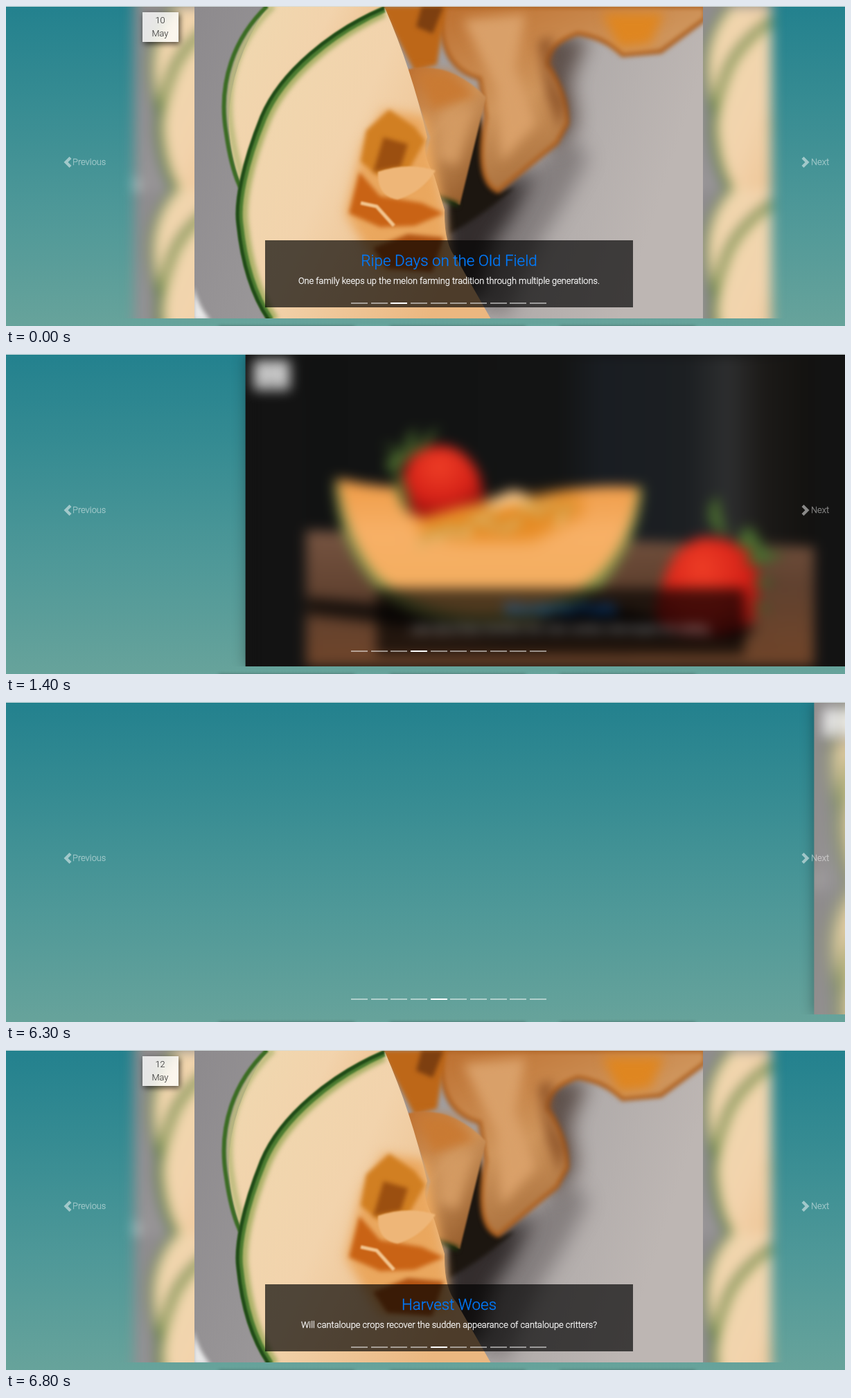
These frames come from a looping animation (1211x463 px, 8 s). An HTML page:

```html
<!DOCTYPE html>
<html lang="en">
<head>
<meta charset="utf-8">
<title>Melon carousel</title>
<style>
  html, body { margin: 0; width: 100%; height: 100%; overflow: hidden; }
  body { font: 300 12.8px/19.2px Roboto, sans-serif; }
  #stage { position: relative; width: 1211px; height: 463px; overflow: hidden;
    background: linear-gradient(#23818e, #358b92 28%, #4e9898 64%, #67a39b); }
  #stage::before { content: ""; position: absolute; z-index: 3; width: 100%; height: 1px; background: #d5dfe0; }
  .card { position: absolute; top: 464px; width: 196px; height: 20px; box-shadow: 0 0 5px #0007; }
  #carousel { position: absolute; top: 1px; width: 1211px; height: 451px; overflow: hidden; }
  .slide { position: absolute; left: 185px; width: 920px; height: 451px; }
  .slide svg { position: absolute; overflow: visible; }
  .moving { overflow: hidden; background: var(--base); box-shadow: 0 0 18px #0005; }
  .moving .content { position: absolute; inset: 0; filter: blur(9px); }
  .backdrop { filter: blur(9px); }
  .b1 { filter: blur(1px); }
  .b3 { filter: blur(3px); }
  .b8 { filter: blur(8px); }
  .b14 { filter: blur(14px); }
  .date { position: absolute; left: 11.5px; top: 8px; width: 52px; height: 41px; padding-top: 2px;
    text-align: center; color: #222; background: #ffffffc8; box-shadow: 2px 3px 8px #000a; }
  .caption { position: absolute; left: 189px; top: 338px; width: 531px; height: 81px; padding-top: 16px;
    text-align: center; color: #fff; background: #000000ab; }
  .caption, .control { -webkit-text-stroke: .3px currentColor; }
  h5 { margin: 0 0 6.4px; font: 300 22.4px/26.9px Roboto, sans-serif; color: #007bff; }
  p { margin: 0; }
  .control { position: absolute; top: 216px; left: 96px; color: #fff; opacity: .5; }
  .control svg { position: absolute; left: -15.5px; top: 2px; width: 16px; height: 16px; fill: #fff; }
  .next { left: 1162px; }
  .next svg { left: -16.5px; }
  .dot { position: absolute; top: 429px; width: 24px; height: 2.4px; background: #fff; }
</style>
</head>
<body>
<svg width="0" height="0" style="position:absolute">
  <defs>
    <linearGradient id="table" x2="1" y2=".2">
      <stop stop-color="#8d8a8d"/><stop offset=".5" stop-color="#a19e9f"/><stop offset="1" stop-color="#bdb6b3"/>
    </linearGradient>
    <linearGradient id="flesh" x2="1" y2=".6">
      <stop stop-color="#efd9b0"/><stop offset=".5" stop-color="#f2d3ac"/><stop offset="1" stop-color="#ebb780"/>
    </linearGradient>
    <linearGradient id="chunk" x2=".6" y2="1">
      <stop stop-color="#bd7030"/><stop offset=".5" stop-color="#cf955c"/><stop offset="1" stop-color="#9a6130"/>
    </linearGradient>
    <linearGradient id="dark">
      <stop stop-color="#111212"/><stop offset=".5" stop-color="#131414"/><stop offset=".58" stop-color="#191d22"/>
      <stop offset=".75" stop-color="#1c1f22"/><stop offset=".83" stop-color="#2d2e2f"/><stop offset=".9" stop-color="#1c1a18"/>
      <stop offset="1" stop-color="#12110f"/>
    </linearGradient>
    <linearGradient id="wood" x2=".1" y2="1">
      <stop stop-color="#765441"/><stop offset=".5" stop-color="#60412f"/><stop offset="1" stop-color="#70452a"/>
    </linearGradient>
    <linearGradient id="pulp" x2="0" y2="1">
      <stop stop-color="#ee9a45"/><stop offset=".4" stop-color="#f7b066"/><stop offset="1" stop-color="#f1ac5c"/>
    </linearGradient>
    <radialGradient id="berry" cx=".45" cy=".3" r=".75">
      <stop stop-color="#ee3a25"/><stop offset=".6" stop-color="#d41c15"/><stop offset="1" stop-color="#86100d"/>
    </radialGradient>
  </defs>

  <symbol id="slices" viewBox="272 1 734 451" preserveAspectRatio="none">
    <path fill="url(#table)" d="M272 0h734v453H272z"/>
    <path class="b14" fill="#5a5354" opacity=".5" d="M640 290L730 250 820 190 840 220Q800 300 770 340L720 453 640 400z"/>
    <path class="b14" fill="#332d2d" d="M630 285L710 262 760 240Q735 305 705 340L680 430 630 400z"/>
    <path class="b14" fill="#4b3c36" opacity=".8" d="M770 40L840 45 815 110 825 170 790 215 770 170z"/>
    <path class="b3" fill="#1c1610" d="M640 290L675 120 712 270 735 262Q700 295 640 330z"/>
    <path class="b3" fill="url(#chunk)" stroke="#ad5f1e" stroke-width="6" d="M628 0H1010V18L945 66 890 71Q865 46 825 40 780 55 782 85 810 130 810 170L795 198 710 268Q676 255 692 160L684 105Q622 90 628 0z"/>
    <path class="b8" fill="#d9a069" d="M660 20L750 12 735 90 765 170 715 225 708 120z"/>
    <path class="b8" fill="#7d431c" opacity=".7" d="M768 50L790 45 785 90 808 140 800 180 780 130z"/>
    <path class="b8" fill="#df8620" d="M860 10h90l-20 45-45 5z"/>
    <path class="b3" fill="#bd6718" d="M540 0H636L622 85 590 95z"/>
    <path class="b3" fill="#7d3f10" d="M592 30L616 40 632 0H600z"/>
    <path class="b1" fill="url(#chunk)" d="M578 92Q640 78 693 132L655 288 598 264 612 190z"/>
    <path class="b8" fill="#c97a33" d="M590 95L640 95 680 130 615 150z"/>
    <path class="b8" fill="#d39a62" d="M630 155L675 145 652 230 622 220z"/>
    <path class="b3" fill="none" stroke="#20330f" stroke-width="7" d="M593 265L653 288"/>
    <path fill="url(#flesh)" d="M378 0H545L340 262Q290 130 378 0z"/>
    <path class="b3" fill="none" stroke="#bcbb7c" stroke-width="9" d="M386 0C338 45 313 110 326 185 330 215 338 240 344 258"/>
    <path class="b1" fill="none" stroke="#3b6c24" stroke-width="6" d="M377 0C330 45 305 110 318 185 323 220 330 245 338 262"/>
    <path fill="url(#flesh)" d="M547 3Q585 90 608 190 598 210 618 245L633 295Q632 345 650 365L700 453H378C355 420 340 375 334 315 330 285 340 230 368 160 395 95 470 35 547 3z"/>
    <path class="b3" fill="none" stroke="#a9b066" stroke-width="12" d="M546 10C476 42 404 100 377 164 350 230 340 285 344 315 350 375 365 420 388 454"/>
    <path class="b1" fill="none" stroke="#4c7c31" stroke-width="9" d="M546 5C472 38 399 97 372 162 344 230 334 285 338 315 344 375 359 420 382 454"/>
    <path class="b1" fill="none" stroke="#1f4a17" stroke-width="5" d="M546 3C470 35 396 95 369 160 341 230 331 285 335 315 341 375 356 420 379 454"/>
    <path class="b8" fill="#eaa75e" d="M545 150L605 160 632 300 640 380 540 385 490 300 515 200z"/>
    <path class="b3" fill="#d17f22" d="M553 150L590 175 605 195 580 240 535 245 512 225 520 180z"/>
    <path class="b3" fill="#9b4f10" d="M545 190L580 200 570 232 530 240z"/>
    <path class="b3" fill="#c96315" d="M510 240L540 275 600 285 632 300 590 318 540 320 495 300z"/>
    <path class="b3" fill="#b05212" d="M530 350L580 330 632 335 615 385 550 380z"/>
    <path class="b1" fill="#eeb678" d="M537 240Q580 225 620 238 600 270 565 280 535 275 537 240z"/>
    <path class="b1" fill="none" stroke="#f2c58f" stroke-width="5" d="M512 285L535 290 560 318"/>
    <path class="b3" fill="#e8e8e8" d="M270 405Q278 435 295 455H270z"/>
  </symbol>

  <symbol id="strawberries" viewBox="272 1 734 451">
    <path fill="url(#dark)" d="M272 0h734v453H272z"/>
    <path fill="url(#wood)" d="M272 255L1006 279V453H272z"/>
    <g id="grain" stroke="#2c1a10" fill="none"></g>
    <path class="b3" fill="#17100c" d="M272 352L390 362 640 350 800 385 925 395 900 415 560 410 272 376z"/>
    <path fill="#7d9146" d="M313 178Q316 290 392 355 440 392 530 392 640 390 700 335 755 270 758 190L740 200 690 300 560 360 400 320z"/>
    <path class="b3" fill="#8b7c40" d="M400 355Q530 400 660 360L600 392Q490 402 400 355z"/>
    <path fill="url(#pulp)" d="M318 180Q370 192 402 192L432 235 530 215 578 198 600 208Q680 186 752 193 742 270 695 318 630 376 520 376 425 372 372 318 330 265 318 180z"/>
    <path class="b8" fill="#e68a22" d="M430 230L530 215 665 200 672 230 600 270 500 270 440 260z"/>
    <path class="b1" fill="#f2c184" d="M528 216L570 196 592 204 598 214 545 225z"/>
    <g id="pips" stroke="#a8691b" stroke-width="1"></g>
    <path fill="url(#berry)" d="M413 175Q420 140 455 133 492 128 514 160 530 185 528 213L440 237Q408 228 413 175z"/>
    <g fill="#4c6a2e" stroke="#2a421a">
      <path d="M388 158Q395 140 420 140L450 134 422 148 400 172 390 168z"/>
      <path d="M418 140Q410 120 433 106 424 125 428 142zM428 140Q440 120 464 106L458 118 436 142zM414 142L382 134Q400 128 414 142z"/>
      <path d="M402 165Q398 205 424 234 420 195 408 172z"/>
    </g>
    <path fill="url(#berry)" d="M788 330Q800 280 840 266 885 262 915 288 932 320 922 375 910 410 850 410 785 412 777 380 775 355 788 330z"/>
    <g fill="#4a6b30" stroke="#243a18">
      <path d="M868 205Q845 220 858 250L884 266Q870 240 868 205z"/>
      <path d="M895 280Q895 250 915 250L938 285 964 290 930 305 905 303 918 285z"/>
      <path d="M920 325L950 328 925 340zM915 358L944 368 925 372z"/>
    </g>
    <g id="specks" fill="#f0b04a"></g>
  </symbol>
</svg>

<div id="stage">
  <div class="card" style="left:307px"></div>
  <div class="card" style="left:554px"></div>
  <div class="card" style="left:799px"></div>
  <div id="carousel"></div>
  <div class="control"><svg viewBox="0 0 8 8"><path d="M5.25 0l-4 4 4 4 1.5-1.5-2.5-2.5 2.5-2.5-1.5-1.5z"/></svg>Previous</div>
  <div class="control next"><svg viewBox="0 0 8 8"><path d="M2.75 0l-1.5 1.5 2.5 2.5-2.5 2.5 1.5 1.5 4-4-4-4z"/></svg>Next</div>
</div>

<script>
const LOOP = 8000, STEP = 100, DURATION = 600, TRAVEL = 1211;
const slides = [
  { day: 10, photo: 'slices', base: '#8f8b88', title: 'Ripe Days on the Old Field',
    text: 'One family keeps up the melon farming tradition through multiple generations.',
    shown: -1e4, enters: -1e4, dot: 2 },
  { day: 11, photo: 'strawberries', base: '#131313', title: 'Wonderful Fruits',
    text: 'Learn about these marvelous new melon varieties melonologists are creating.',
    shown: 1100, enters: 952, dot: 3, dotStart: 440 },
  { day: 12, photo: 'slices', base: '#8f8b88', title: 'Harvest Woes',
    text: 'Will cantaloupe crops recover the sudden appearance of cantaloupe critters?',
    shown: 6100, enters: 6119, dot: 4, dotStart: 5620 },
];

let seed = 7;
const random = (low, high) => {
  seed = (seed * 16807) % 2147483647;
  return low + (high - low) * seed / 2147483647;
};
const repeat = (count, make) => Array.from({ length: count }, (_, i) => make(i)).join('');
const fill = (id, html) => { document.getElementById(id).innerHTML = html; };

const ellipse = (x, y, rx, ry, turn, extra = '') =>
  `<ellipse rx="${rx}" ry="${ry}" transform="translate(${x} ${y}) rotate(${turn})" ${extra}/>`;

fill('grain', repeat(34, () => {
  const x = random(230, 900), y = random(268, 448), length = random(80, 300);
  return `<path opacity="${random(.15, .5)}" d="M${x} ${y}q${length / 2} ${random(-4, 6)} ${length} 6"/>`;
}));
fill('pips', repeat(30, i => {
  const x = 440 + i * 7.3;
  return ellipse(x, 262 - (x - 440) * .18 + random(-16, 14), 9, 5, random(-70, 30),
    `fill="${i % 3 ? '#e3b056' : '#f0cd80'}"`);
}));
const specks = (count, cx, cy, rx, ry) => repeat(count, i => {
  const radius = Math.sqrt((i + .5) / count), angle = i * 2.4;
  return ellipse(cx + rx * radius * Math.cos(angle), cy + ry * radius * Math.sin(angle), 1, 1.7, 15);
});
fill('specks', specks(48, 472, 183, 50, 44) + specks(75, 852, 338, 62, 64));

// The backdrop repeats a small copy of the photo
const tile = { width: 400, height: 265 };
const tiles = [0, 1, 2].flatMap(column => [0, 1].map(row =>
  `<use href="#slices" x="${column * tile.width}" y="${30 + row * tile.height}"
    width="${tile.width}" height="${tile.height}"/>`)).join('');

const carousel = document.getElementById('carousel');
const slideNodes = slides.map(({ day, photo, base, title, text }) => {
  const node = document.createElement('div');
  node.style.setProperty('--base', base);
  node.innerHTML = `<div class="content">
    <svg width="920" height="451">
      <g class="backdrop"><svg y="-30" width="920" height="511" style="overflow:hidden">
        <rect width="920" height="511" fill="${base}"/>${photo === 'slices' ? tiles : ''}
      </svg></g>
      <use href="#${photo}" x="87" width="734" height="451"/>
    </svg>
    <div class="date">${day}<br>May</div>
    <div class="caption"><h5>${title}</h5><p>${text}</p></div>
  </div>`;
  carousel.append(node);
  return node;
});

const dots = Array.from({ length: 10 }, (_, i) => {
  const dot = document.createElement('div');
  dot.className = 'dot';
  dot.style.left = 498 + i * 28.67 + 'px';
  document.getElementById('stage').append(dot);
  return dot;
});

// CSS-style cubic-bezier easing, solved by bisection
const bezier = (x1, y1, x2, y2) => x => {
  if (x <= 0) return 0;
  if (x >= 1) return 1;
  const curve = (a, b, s) => 3 * a * s * (1 - s) ** 2 + 3 * b * s * s * (1 - s) + s ** 3;
  let low = 0, high = 1;
  for (let i = 0; i < 24; i++) {
    const mid = (low + high) / 2;
    if (curve(x1, x2, mid) < x) low = mid; else high = mid;
  }
  return curve(y1, y2, low);
};
const easeInOut = bezier(.42, 0, .58, 1);
const ease = bezier(.25, .1, .25, 1);

function draw(time) {
  const current = slides.findLastIndex(slide => time >= slide.shown);
  slideNodes.forEach((node, i) => {
    const progress = (time - slides[i].enters) / DURATION;
    node.style.display = i === current ? '' : 'none';
    node.className = progress < 1 ? 'slide moving' : 'slide';
    node.style.transform = progress < 1 ? `translateX(${TRAVEL * (1 - easeInOut(progress))}px)` : '';
  });

  const lit = slides.map(({ dotStart }) => dotStart ? ease((time - dotStart) / DURATION) : 1);
  dots.forEach((dot, i) => {
    const index = slides.findIndex(slide => slide.dot === i);
    const glow = index < 0 ? 0 : lit[index] - (lit[index + 1] ?? 0);
    dot.style.opacity = .5 + .5 * glow;
  });
}

function tick() {
  draw(Math.floor(performance.now() % LOOP / STEP) * STEP);
  requestAnimationFrame(tick);
}
tick();
</script>
</body>
</html>
```
